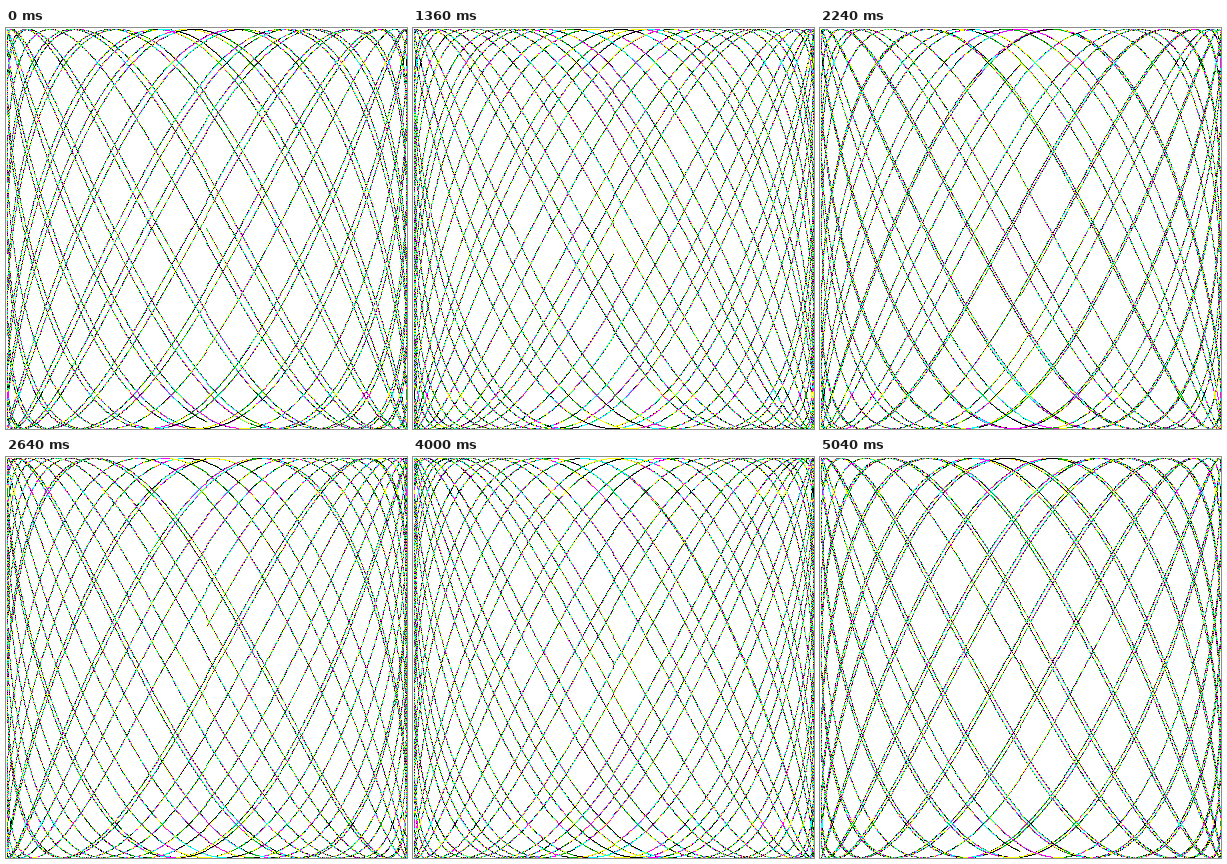
These frames come from a looping animation (401 px wide and 401 px high, 5.12 s). An HTML page with a canvas:

```html
<!DOCTYPE html>
<html>
<head>
<meta charset="utf-8">
<title>Lissajous figure</title>
<style>
  html, body { margin: 0; width: 100%; height: 100%; overflow: hidden; background: #fff; }
  canvas { display: block; }
</style>
</head>
<body>
<canvas id="stage" width="401" height="401"></canvas>
<script>
const RADIUS = 200, SIDE = 2 * RADIUS + 1;
const CYCLES = 15, STEP = 0.001, FREQ = 1.8139808639388589;
const POSES = 64, POSE_MS = 80, PHASE_STEP = 0.1;

// Ink colours as 0xAABBGGRR, taken in turn along the curve.
const INKS = [0xff000000, 0xff00aa00, 0xff00ffff, 0xffff00ff, 0xffffff00];
const WHITE = 0xffffffff;

const ctx = document.getElementById('stage').getContext('2d');
const image = ctx.createImageData(SIDE, SIDE);
const pixels = new Uint32Array(image.data.buffer);

// Rounds up by half, then truncates towards the centre.
const toPixel = v => RADIUS + Math.trunc(v * RADIUS + 0.5);

function drawCurve(phase) {
  pixels.fill(WHITE);
  const end = CYCLES * 2 * Math.PI;
  for (let i = 0, t = 0; t < end; t = ++i * STEP) {
    const x = toPixel(Math.sin(t));
    const y = toPixel(Math.sin(t * FREQ + phase));
    pixels[y * SIDE + x] = INKS[i % INKS.length];
  }
  ctx.putImageData(image, 0, 0);
}

let shown = -1;
function tick() {
  const pose = Math.floor(performance.now() / POSE_MS) % POSES;
  if (pose !== shown) {
    drawCurve(pose * PHASE_STEP);
    shown = pose;
  }
  requestAnimationFrame(tick);
}
tick();
</script>
</body>
</html>
```
